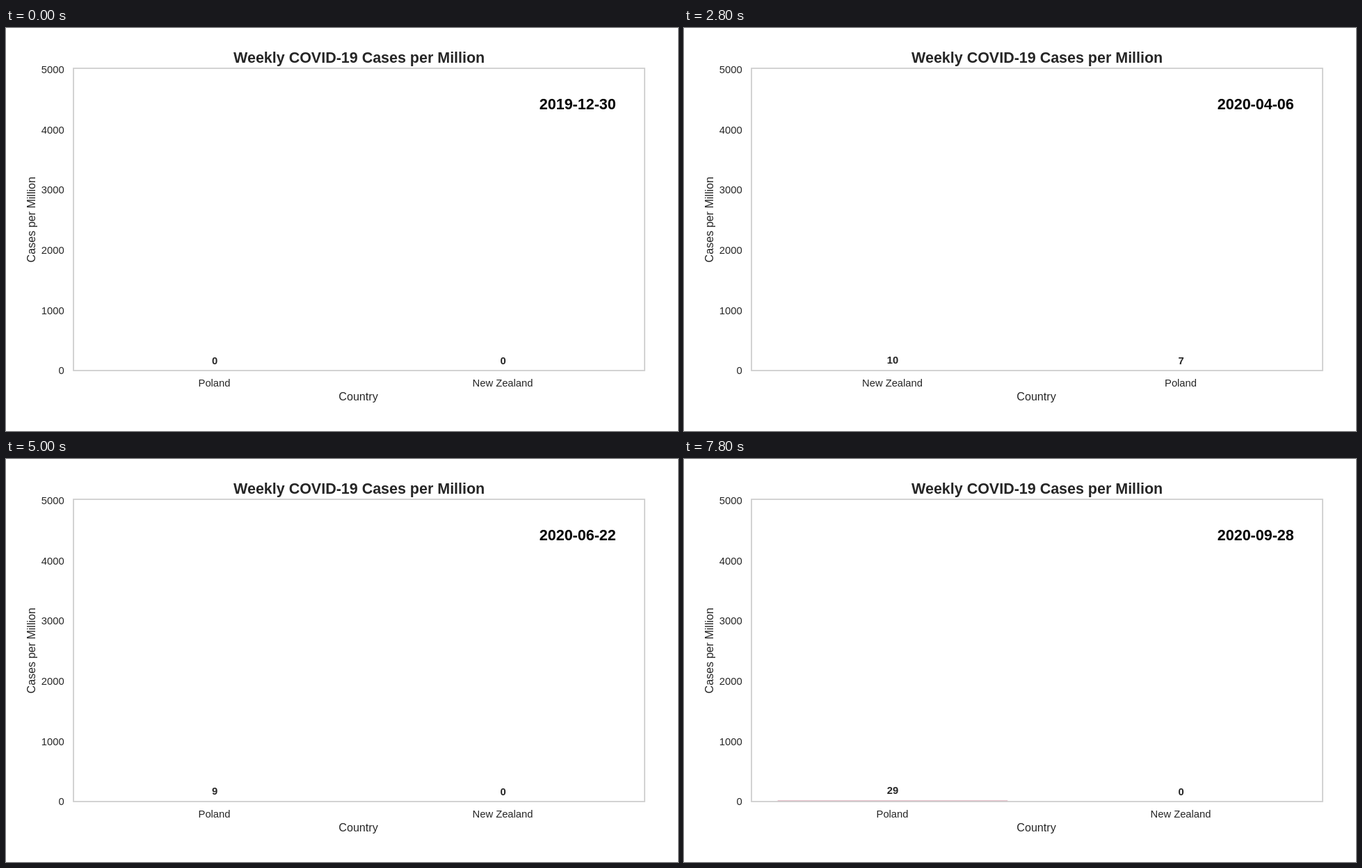
These frames come from a looping animation (966 px wide and 580 px high, 8 s). An HTML page with a canvas:

```html
<!DOCTYPE html>
<html lang="en">
<head>
<meta charset="utf-8">
<title>Weekly COVID-19 Cases per Million</title>
<style>
  html, body { margin: 0; width: 100%; height: 100%; overflow: hidden; background: #fff; }
  canvas { display: block; }
</style>
</head>
<body>
<canvas id="chart" width="966" height="580"></canvas>
<script>
const ctx = document.getElementById('chart').getContext('2d');
const WEEK_MS = 200, WEEKS = 40;
const INK = '#262626', SPINE = '#cccccc', BAR = '#e2b6c2';
const PLOT = { left: 97, right: 918, top: 58, bottom: 493 };
const UNIT = 0.08664;            // pixels per case
const SLOTS = [299.9, 714.4], BAR_WIDTH = 331.6;
const SIZE = { tick: 14.76, axis: 16.1, title: 21.47 };

// Weekly values from the first non-zero week on
const series = [
  { name: 'Poland', start: 10, values: [0.02, 0.35, 1.5, 3.9, 7.1, 9.8, 8.6, 9.1, 7.5, 8.2,
    9.3, 9.6, 9.4, 8.7, 10.9, 9.3, 7.5, 7.2, 6.4, 8, 10.3, 13.3, 19.5, 15.4, 18.2, 18.1,
    14.9, 11.7, 16.8, 29] },
  { name: 'New Zealand', start: 9, values: [0.03, 0.1, 0.03, 1.7, 10.6, 10.3, 5.8, 1.6, 0.6, 0.4] }
];

// Centres or right-aligns the visible ink of a string
function text(str, x, baseline, size, { bold = false, color = INK, align = 'center' } = {}) {
  ctx.font = `${bold ? 'bold ' : ''}${size}px "Liberation Sans", Arial, sans-serif`;
  ctx.fillStyle = color;
  const m = ctx.measureText(str);
  const right = m.actualBoundingBoxRight, left = m.actualBoundingBoxLeft;
  ctx.fillText(str, x - (align === 'right' ? right : (right - left) / 2), baseline);
}

function drawAxes() {
  ctx.strokeStyle = SPINE;
  ctx.lineWidth = 1.7;
  ctx.strokeRect(PLOT.left, PLOT.top, PLOT.right - PLOT.left, PLOT.bottom - PLOT.top);
  for (let v = 0; v <= 5000; v += 1000) {
    text(String(v), 83.4, PLOT.bottom + 5.3 - v * UNIT, SIZE.tick, { align: 'right' });
  }
  text('Weekly COVID-19 Cases per Million', 507.1, 49.5, SIZE.title, { bold: true });
  text('Country', 507, 535.6, SIZE.axis);
  ctx.save();
  ctx.translate(42, 276.2);
  ctx.rotate(-Math.PI / 2);
  text('Cases per Million', 0, 0, SIZE.axis);
  ctx.restore();
}

function drawWeek(week) {
  ctx.fillStyle = '#fff';
  ctx.fillRect(0, 0, 966, 580);

  const ranked = series
    .map(s => ({ name: s.name, value: s.values[week - s.start] || 0 }))
    .sort((a, b) => b.value - a.value);

  ranked.forEach(({ value }, i) => {
    // The white bar edge and the axis line hide very low bars
    const height = value * UNIT - 0.7;
    if (height < 1.2) return;
    ctx.fillStyle = BAR;
    ctx.fillRect(SLOTS[i] - BAR_WIDTH / 2 + 0.5, PLOT.bottom - height, BAR_WIDTH - 1, height);
  });
  drawAxes();
  ranked.forEach(({ name, value }, i) => {
    text(name, SLOTS[i], 516.4, SIZE.tick);
    text(String(Math.round(value)), SLOTS[i], 484.2 - value * UNIT, SIZE.tick, { bold: true });
  });

  const date = new Date(Date.UTC(2019, 11, 30 + 7 * week)).toISOString().slice(0, 10);
  text(date, 821.8, 117.4, SIZE.title, { bold: true, color: '#000' });
}

const start = performance.now();
function frame() {
  const elapsed = performance.now() - start;
  drawWeek(Math.floor(elapsed / WEEK_MS) % WEEKS);
  requestAnimationFrame(frame);
}
frame();
</script>
</body>
</html>
```
